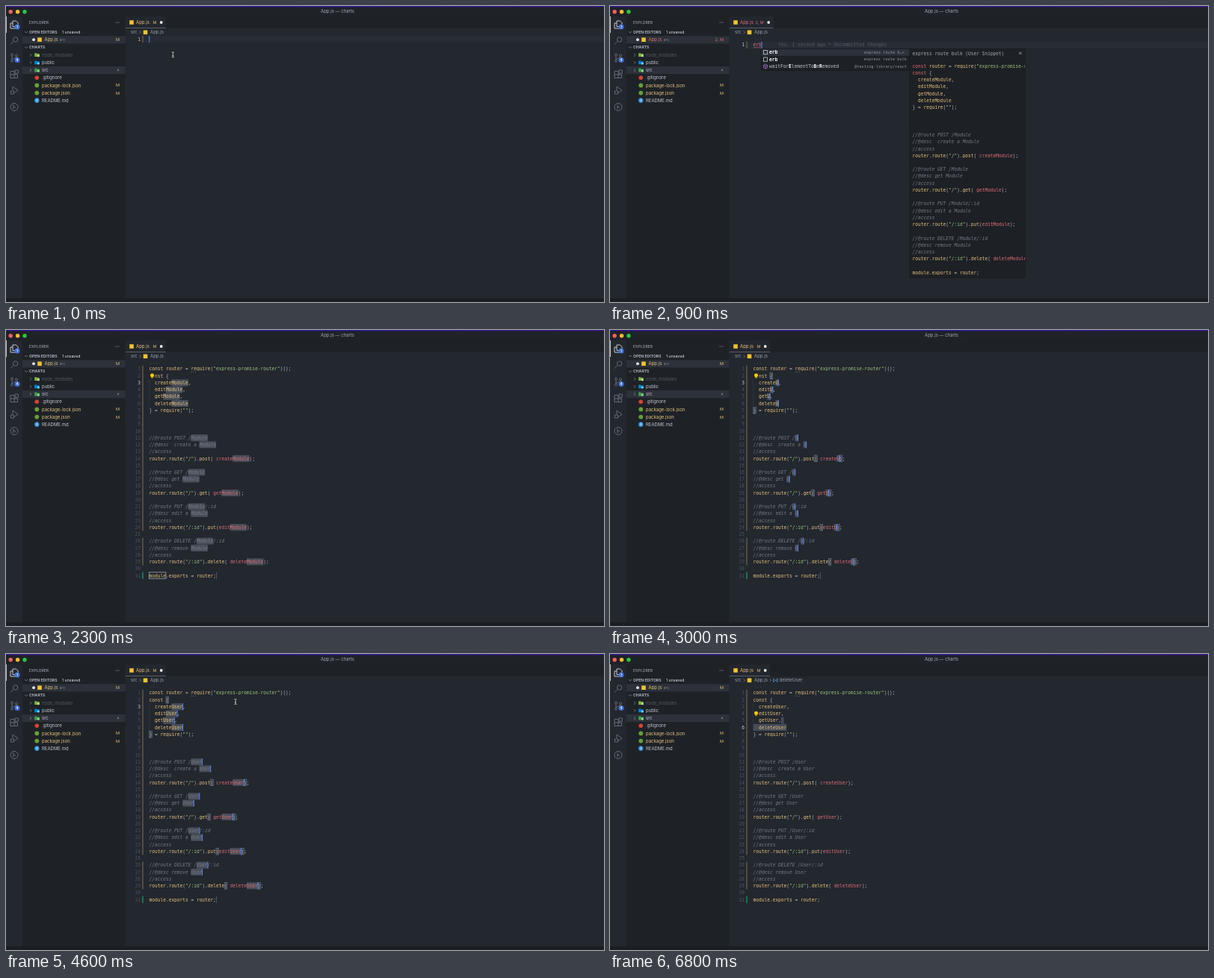
These frames come from a looping animation (800 px wide and 397 px high, 6900 ms). An HTML page with a canvas:

```html
<!DOCTYPE html>
<html lang="en">
<head>
<meta charset="utf-8">
<title>App.js — charts</title>
<style>
html, body { margin: 0; width: 100%; height: 100%; overflow: hidden; background: #23272e; }
canvas { display: block; width: 800px; height: 397px; }
</style>
</head>
<body>
<canvas id="stage"></canvas>
<script>
const LOOP = 6900, CW = 3.725, LH = 9.235, LEFT = 191.6;
const MONO = '"DejaVu Sans Mono", monospace', UI = 'Inter, sans-serif';
const C = {
  bg: '#23272e', side: '#1e2227', row: '#2c313a', text: '#abb2bf', white: '#e6e8ec', dim: '#4b5262',
  yellow: '#e5c07b', red: '#e06c75', green: '#98c379', comment: '#727a87', blue: '#528bff', js: '#f5c32c'
};
const CODE = `const router = require("express-promise-router")();
const {
  create$,
  edit$,
  get$,
  delete$
} = require("");



//@route POST /$
//@desc  create a $
//access
router.route("/").post( create$);

//@route GET /$
//@desc get $
//access
router.route("/").get( get$);

//@route PUT /$/:id
//@desc edit a $
//access
router.route("/:id").put(edit$);

//@route DELETE /$/:id
//@desc remove $
//access
router.route("/:id").delete( delete$);

module.exports = router;`.split('\n');

// Pointer path: time, x, y
const PATH = [[4300, 650, -10], [4600, 307, 64], [4900, 230, 89], [5200, 237, 98],
  [5600, 680, 36], [5900, 571, 32], [6400, 615, -10]];

const canvas = document.getElementById('stage'), g = canvas.getContext('2d');
const dpr = window.devicePixelRatio || 1;
canvas.width = 800 * dpr;
canvas.height = 397 * dpr;

function box(x, y, w, h, color) {
  g.fillStyle = color;
  g.fillRect(x, y, w, h);
}

function frame(x, y, w, h, color, width = .6) {
  g.strokeStyle = color;
  g.lineWidth = width;
  g.strokeRect(x, y, w, h);
}

function dot(x, y, r, color) {
  g.fillStyle = color;
  g.beginPath();
  g.arc(x, y, r, 0, 7);
  g.fill();
}

function draw(path, x, y, color, width = .9, fill) {
  g.save();
  g.translate(x, y);
  g.lineWidth = width;
  g.strokeStyle = g.fillStyle = color;
  const p = new Path2D(path);
  fill ? g.fill(p) : g.stroke(p);
  g.restore();
}

// Text is set ten times larger and scaled down so that advances stay fractional.
function write(s, x, y, color, size, font, style = '', align = 'left') {
  g.save();
  g.translate(x, y + size * .355);
  g.scale(.1, .1);
  g.font = `${style} ${size * 10}px ${font}`;
  g.textAlign = align;
  g.fillStyle = color;
  g.fillText(s, 0, 0);
  g.restore();
}
const ui = (s, x, y, color = C.text, size = 6, style, align) => write(s, x, y, color, size, UI, style, align);
const mono = (s, x, y, color = C.text, style, align, size = 6.187) => write(s, x, y, color, size, MONO, style, align);

function chevron(x, y, down) {
  draw(down ? 'M-2-1L0 1L2-1' : 'M-1-2L1 0L-1 2', x, y, '#8b929e', .7);
}

const jsIcon = (x, y) => box(x - 2.8, y - 2.8, 5.6, 5.6, C.js);

function folder(y, color, mark) {
  draw('M-3.3-2.5H-.6L.2-1.6H3.2V2.4H-3.3Z', 41.5, y, color, 1, true);
  dot(43.3, y + 1, 1.5, mark);
}

function bulb(x, y) {
  dot(x, y - .8, 2.5, '#ffcc00');
  box(x - 1.1, y + 1.4, 2.2, 1.7, '#c9a21c');
}

function activityBar() {
  box(0, 14, .9, 22, '#d7dae0');
  const gray = '#6b727f';
  draw('M-2-5H2.5L5-2.5V2.5H-2ZM-2-2H-5V5H2V2.5', 11, 25, '#d7dae0');
  draw('M-1 1L-5 5M-1.5-1.5A3.2 3.2 0 1 1 4.9-1.5A3.2 3.2 0 1 1-1.5-1.5', 11, 46.5, gray);
  draw('M-3-2V3M3-1C3 2-2 0-3 3M-4.5-3.5A1.5 1.5 0 1 1-1.5-3.5A1.5 1.5 0 1 1-4.5-3.5' +
    'M1.5-2.5A1.5 1.5 0 1 1 4.5-2.5A1.5 1.5 0 1 1 1.5-2.5M-4.5 4.5A1.5 1.5 0 1 1-1.5 4.5A1.5 1.5 0 1 1-4.5 4.5', 11, 69, gray);
  draw('M-5-3.5H0V5.5H-5ZM-5 1H4.5V5.5H0M1-5H5.3V-.7H1Z', 11, 91, gray);
  draw('M-2-5L5 0L0 3.5M-2-5V0M-4.5 1H-.5V5H-4.5Z', 11, 113, gray);
  draw('M-5 0A5 5 0 1 1 5 0A5 5 0 1 1-5 0M-1-3V3M-1-1L2 1', 11, 135.5, gray);
  [['1', 28], ['4', 72.5]].forEach(([n, y]) => {
    dot(15, y, 3.5, '#3f72d8');
    ui(n, 15, y, '#fff', 4.4, '600', 'center');
  });
}

function sidebar(errors) {
  box(22, 14, 137.5, 378, C.side);
  ui('EXPLORER', 31, 22, C.text, 5.1);
  [147, 149, 151].forEach(x => dot(x, 22, .5, C.text));
  chevron(27, 35, true);
  ui('OPEN EDITORS', 31, 35, C.text, 5.1, '700');
  ui('1 unsaved', 75, 35, C.white, 5.2);
  box(22, 40.3, 137.5, 10, C.row);
  dot(37, 45.2, 1.9, C.white);
  jsIcon(45, 45.2);
  const tone = errors ? C.red : C.yellow;
  ui('App.js', 51.5, 45.2, tone);
  ui('src', 71.5, 45.2, '#858c98', 5.3);
  ui(errors ? '2, M' : 'M', 152, 45.2, tone, 5.5, '', 'right');
  chevron(27, 55.5, true);
  ui('CHARTS', 31, 55.5, C.text, 5.1, '700');
  box(22, 81, 137.5, 10.1, C.row);
  const names = ['node_modules', 'public', 'src', '.gitignore', 'package-lock.json', 'package.json', 'README.md'];
  names.forEach((name, i) => {
    const y = 65.7 + i * 10.17, modified = name.startsWith('package');
    if (i < 3) chevron(33, y);
    ui(name, 48, y, i ? (modified ? C.yellow : '#c3c8d1') : '#525966');
    if (modified) {
      dot(41.3, y, 2.9, '#689f38');
      ui('M', 152, y, C.yellow, 5.5, '', 'right');
    }
  });
  folder(65.7, '#7cb342', '#c5e1a5');
  folder(75.9, '#0288d1', '#81d4fa');
  folder(86, '#43a047', '#a5d6a7');
  dot(150, 86, 1.4, '#5f6c5c');
  dot(41.3, 96.2, 2.8, '#d84332');
  dot(41.3, 126.7, 3.1, '#3f9be8');
  ui('i', 41.3, 126.7, '#fff', 4.6, '700', 'center');
}

function chrome(errors, symbol) {
  box(0, 0, 800, 397, C.bg);
  box(0, 0, 800, 14, '#1f2228');
  const top = g.createLinearGradient(0, 0, 800, 0);
  top.addColorStop(0, '#35129a');
  top.addColorStop(.5, '#2b16a8');
  top.addColorStop(1, '#3a1296');
  box(0, 0, 800, 1.3, top);
  ['#ff5f57', '#febc2e', '#28c840'].forEach((c, i) => dot(6.2 + i * 9.4, 7.7, 2.7, c));
  ui('App.js — charts', 443.5, 7.3, '#a4abb7', 6, '', 'center');
  activityBar();
  sidebar(errors);

  const wide = errors ? 218.5 : 214;
  box(159.5, 14, 641, 15.7, C.side);
  box(159.5, 14, wide - 159.5, 15.7, C.bg);
  box(159.5, 29, wide - 159.5, .7, '#6c7686');
  jsIcon(168, 22);
  const tone = errors ? C.red : C.yellow;
  ui('App.js', 174, 22, tone);
  ui(errors ? '2, M' : 'M', errors ? 194.5 : 196.5, 22, tone, 5.4);
  dot(wide - 6.3, 22, 1.9, C.white);

  ui('src', 167, 35.3, '#9aa1ad');
  chevron(179.5, 35.3);
  jsIcon(186.5, 35.3);
  ui('App.js', 193, 35.3, '#9aa1ad');
  if (symbol) {
    chevron(214.5, 35.3);
    draw('M-1.4-2H-2.6V2H-1.4M1.4-2H2.6V2H1.4M-1.2 0H1.2', 221.3, 35.3, '#61afef', .8);
    ui('deleteUser', 226.5, 35.3, '#9aa1ad');
  }
  box(0, 392, 800, 5, '#1b1e23');
}

function codeLine(raw, word, x, y, keyword) {
  const tokens = raw.replace('$', word).matchAll(/\/\/.*|"[^"]*"|\w+|[^\w"\/]+/g);
  for (const { 0: s, index } of tokens) {
    const comment = s.startsWith('//');
    const color = comment ? C.comment
      : s[0] === '"' ? C.green
      : s === 'const' ? keyword
      : !/\w/.test(s) ? C.text
      : raw.includes('route(') && s.endsWith(word) ? C.red : C.yellow;
    mono(s, x + index * CW, y, color, comment ? 'italic' : '');
  }
}

const lineY = n => 52.3 + (n - 1) * LH;
const caret = (x, y) => box(x - .3, y - 4.6, 1, 9.2, C.blue);
const gutter = (y, h, color = '#6f6347') => box(182.3, y, 1.3, h, color);
const lineNo = (n, y, active) => mono(n, 180, y, active ? '#c5cad3' : C.dim, '', 'right');
const lens = () => mono('...', 192, 43, '#4d5461');

function typing(t) {
  const typed = 'erb'.slice(0, t < 400 ? 0 : t < 600 ? 1 : t < 700 ? 2 : 3);
  const y = t < 600 ? 44.5 : lineY(1);
  if (t >= 600) lens();
  box(184, y - 4.6, 616, 9.2, '#282c34');
  lineNo(1, y, true);
  gutter(y - 4.6, 9.2);
  mono(typed, LEFT, y, C.red);
  if (typed.length === 3) {
    draw('M0 0l1.2-1l1.2 1l1.2-1l1.2 1l1.2-1l1.2 1l1.2-1l1.2 1l1.2-1', LEFT, y + 4, C.red, .6);
    mono('You, 1 second ago • Uncommitted changes', 225, y, '#545b68');
  }
  if (t !== 100 && t !== 200) caret(LEFT + typed.length * CW, y);
  if (typed.length === 3) suggestions();
}

function suggestions() {
  const panel = '#1d2025', gray = '#8f96a2';
  box(202, 57.5, 199, 28.8, panel);
  box(202, 57.5, 199, 9.3, '#2c313a');
  frame(202, 57.5, 199, 28.8, '#15181c');
  [62.2, 71.6].forEach(y => {
    frame(205.4, y - 2.6, 5, 5.2, '#c5cad3', .8);
    mono('erb', 213, y, '#fff', 'bold');
  });
  mono('express route b…>', 394, 62.2, gray, '', 'right', 5.28);
  mono('express route bulk', 397, 71.6, gray, '', 'right', 5.28);
  draw('M0-3L2.6-1.5V1.5L0 3L-2.6 1.5V-1.5ZM-2.6-1.5L0 0L2.6-1.5M0 0V3', 208, 81, '#b180d7', .7);
  [...'waitForElementToBeRemoved'].forEach((ch, i) => {
    const hit = [7, 16, 18].includes(i);
    mono(ch, 213 + i * CW, 81, hit ? '#fff' : '#c0c5cf', hit ? 'bold' : '');
  });
  mono('@testing-library/react', 397, 81, gray, '', 'right', 5.28);

  g.save();
  g.beginPath();
  g.rect(401, 57.5, 154.5, 307);
  g.clip();
  box(401, 57.5, 154.5, 307, panel);
  mono('express route bulk (User Snippet)', 404.6, 63.4, '#a4abb7');
  draw('M-1.7-1.7L1.7 1.7M1.7-1.7L-1.7 1.7', 549, 63.4, '#c5cad3', .7);
  CODE.forEach((raw, i) => codeLine(raw, 'Module', 404.6, 80.5 + i * LH, C.red));
  g.restore();
  frame(401, 57.5, 154.5, 307, '#15181c');
}

function bracket(line, col) {
  const x = LEFT + col * CW, y = lineY(line);
  box(x, y - 4.4, CW, 8.8, '#3a404b');
  frame(x, y - 4.4, CW, 8.8, '#7a8190', .5);
}

function editor(t) {
  const word = t < 2800 ? 'Module' : 'User'.slice(0, t < 3200 ? 1 : t < 3400 ? 2 : t < 3600 ? 3 : 4);
  const renaming = t >= 2800 && t < 4900, picked = t >= 5200;
  const active = t < 4900 ? 3 : picked ? 6 : 5;
  lens();
  if (picked) {
    box(LEFT + 10 * CW, lineY(5) - 4.6, CW, 9.2, '#454b58');
    box(LEFT, lineY(6) - 4.6, 12 * CW, 9.2, '#454b58');
  } else if (t >= 4900) {
    box(184, lineY(5) - 4.6, 616, 9.2, '#282c34');
  }
  if (renaming) {
    bracket(2, 6);
    bracket(7, 0);
  }
  CODE.forEach((raw, i) => {
    const n = i + 1, y = lineY(n), at = raw.indexOf('$');
    const x = LEFT + at * CW, w = word.length * CW;
    lineNo(n, y, n === active);
    if (n > 2 && n < 7) box(LEFT, y - 4.6, .5, 9.2, '#3b4048');
    if (at >= 0 && t < 4900) box(x, y - 4.5, w, 9, '#4a4f5a');
    const full = raw.replace('$', word);
    if (renaming && raw.includes('route(')) {
      bracket(n, full.lastIndexOf('('));
      bracket(n, full.lastIndexOf(')'));
    }
    codeLine(raw, word, LEFT, y, C.yellow);
    if (at >= 0 && renaming) caret(x + w, y);
  });
  gutter(lineY(1) - 4.6, 24 * LH);
  gutter(lineY(26) - 4.6, 4 * LH);
  gutter(lineY(31) - 4.6, LH, '#179a6b');
  [0, 2, 4].forEach(d => box(247.6 + d * 1.3, 55.9, .8, .8, '#9aa1ad'));
  if (t >= 1800 && t < 2800) frame(LEFT, lineY(31) - 4.4, 6 * CW, 8.8, '#c5cad3');
  if (t < 4900) box(LEFT + 24 * CW, lineY(31) - 4.6, .6, 9.2, '#6b727f');
  if (t >= 1800 && t < 3800) {
    box(191, lineY(2) - 4.4, 8, 8.8, C.bg);
    bulb(195.5, lineY(2));
  }
  if (t >= 5400) bulb(195.5, lineY(4));
}

function pointer(x, y) {
  if (y > 38) {
    const beam = 'M-1.7-3.6Q0-3.6 0-2.4Q0-3.6 1.7-3.6M0-2.4V2.4M-1.7 3.6Q0 3.6 0 2.4Q0 3.6 1.7 3.6M-1 .9H1';
    draw(beam, x, y, '#111', 1.6);
    draw(beam, x, y, '#e8eaee', .8);
  } else {
    const hand = 'M-1.4-3.4Q-.6-4.2-.2-3.2V-1L2.2-.4Q2.8 0 2.5 1.2L2 3.4H-1L-2.6.6Q-2.4-.2-1.4.4Z';
    draw(hand, x, y, '#111', 1.2);
    draw(hand, x, y, '#fff', 1, true);
  }
}

function movePointer(t) {
  if (t < 300) return pointer(223.3, 65.3);
  const k = PATH.findIndex(p => p[0] > t);
  if (k < 1) return;
  const [t0, x0, y0] = PATH[k - 1], [t1, x1, y1] = PATH[k];
  const u = (t - t0) / (t1 - t0), e = u * u * (3 - 2 * u);
  pointer(x0 + (x1 - x0) * e, y0 + (y1 - y0) * e);
}

const start = performance.now();
function tick() {
  const t = Math.floor((performance.now() - start) % LOOP / 100) * 100;
  g.setTransform(dpr, 0, 0, dpr, 0, 0);
  chrome(t >= 700 && t < 1300, t >= 5200);
  t < 1300 ? typing(t) : editor(t);
  movePointer(t);
  requestAnimationFrame(tick);
}
tick();
</script>
</body>
</html>
```
